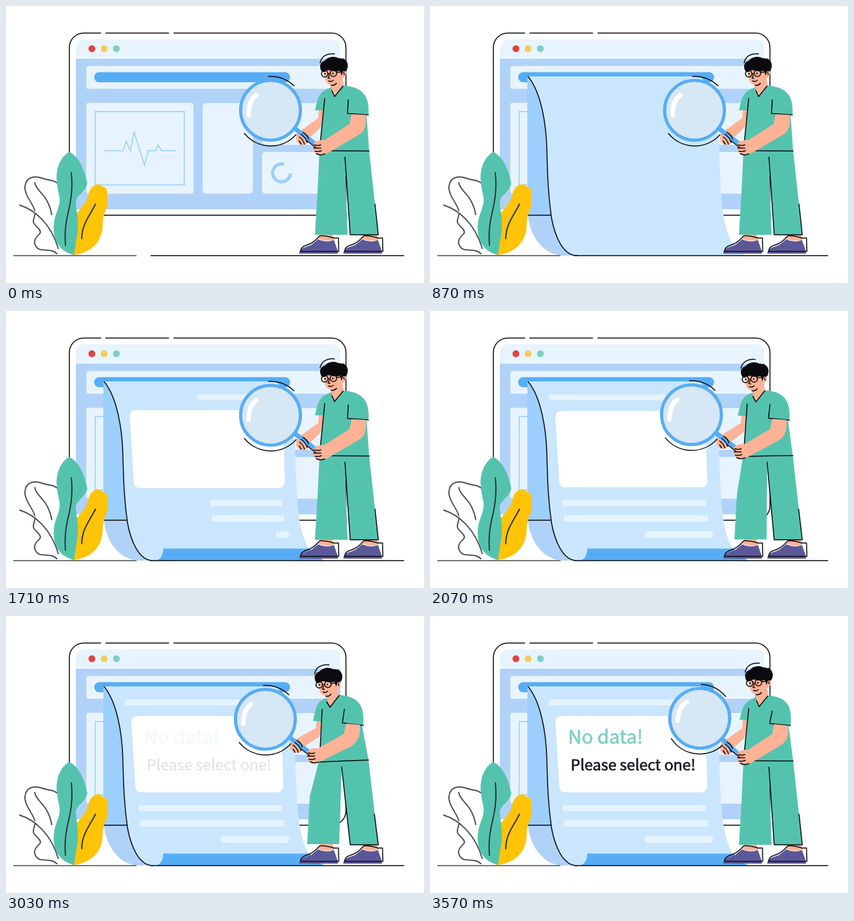
Recreate the animation shown at these times as an HTML page. Size 640x425 px, loop 4.5 s.

```html
<!DOCTYPE html>
<html lang="en">
<head>
<meta charset="utf-8">
<title>No data</title>
<style>
html, body { margin: 0; width: 100%; height: 100%; overflow: hidden; background: #fff }
svg { display: block; width: 100vw; height: 100vh }
.line { fill: none; stroke: #0b0b0f; stroke-width: 1.5; stroke-linecap: round; stroke-linejoin: round }
.vein { stroke: #2b3036; stroke-width: 1.9 }
.sprig { stroke: #4a4f54; stroke-width: 1.9 }
.panel { fill: #e7f4fe }
.chart { fill: none; stroke: #9dcffa; stroke-width: 1.6 }
.ring { stroke-width: 5 }
.blue { fill: #57adf4 }
.green { fill: #54c3ae }
.skin { fill: #ffb296 }
text { font-family: "Noto Sans CJK SC", "Noto Sans CJK JP", "Noto Sans", sans-serif; font-weight: 500; stroke-width: .65 }
</style>
</head>
<body>
<svg viewBox="0 0 640 425">
  <defs>
    <clipPath id="sheetClip"><rect id="sheetBox" x="140" y="108" width="360" height="0"/></clipPath>
    <clipPath id="rollClip"><rect id="rollBox" x="200" y="383" width="300" height="20"/></clipPath>
    <g id="shoe">
      <path class="skin" d="M481 350H500L503 358Q491 363 478 357Z"/>
      <path fill="#5b5899" d="M449 380C449 370 462 370 468 366L478 358Q490 364 502 359L508 376V380Z"/>
      <path class="line" d="M480 353C474 360 468 365 460 367C453 369 451 372 451 376.500H509.500L509 356H502Q491 352 481 352.500"/>
    </g>
  </defs>

  <!-- browser window -->
  <path class="panel" d="M107 81V64A13 13 0 0 1 120 51H499A13 13 0 0 1 512 64V81Z"/>
  <path fill="#b1d2f8" d="M107 81H512V312H107Z"/>
  <path class="line" d="M257 41.500H498.500A22 22 0 0 1 520.500 63.500V299A22 22 0 0 1 498.500 321H119A22 22 0 0 1 97 299V63.500A22 22 0 0 1 119 41.500H145M153 41.500H249"/>
  <circle cx="131.500" cy="65.500" r="5.200" fill="#e0413f"/>
  <circle cx="150.200" cy="65.500" r="5.200" fill="#f2cb5b"/>
  <circle cx="169" cy="65.500" r="5.200" fill="#80cfc0"/>
  <g class="panel">
    <rect x="123" y="92" width="374" height="35" rx="4"/>
    <rect x="123" y="148.500" width="164" height="139.500" rx="4"/>
    <rect x="301" y="149" width="77" height="139" rx="6"/>
    <rect x="392" y="149" width="105" height="64" rx="5"/>
    <rect x="392" y="224" width="105" height="64" rx="5"/>
  </g>
  <rect class="blue" x="135" y="101.500" width="300" height="15.500" rx="7.750"/>
  <g class="chart">
    <rect x="136.500" y="162" width="136.500" height="112.500"/>
    <path d="M150 222H179L184 207.500L190.500 222L196 193L212 244L218 222H229L233 213.500L238 222H260"/>
    <path class="ring" d="M426 242.900A13.700 13.700 0 1 0 435.600 257"/>
  </g>

  <!-- sheet of paper -->
  <g clip-path="url(#sheetClip)">
    <path fill="#b0d2f8" d="M150 321C152 350 172 383 205 383H225L200 300Z"/>
    <path fill="#9dcffd" d="M149 108V321H195L190 108Z"/>
    <path class="line" d="M149 321H190"/>
    <path fill="#c9e6fe" d="M150 108C170 132 178 180 179 222C180 262 181 290 186 325C191 352 203 383 225 383H489C467 383 455 352 450 325C445 290 444 262 443 222C442 180 434 132 414 108Z"/>
    <path class="line" d="M150 108C170 132 178 180 179 222C180 262 181 290 186 325C191 352 203 383 225 383"/>
  </g>
  <g clip-path="url(#rollClip)">
    <path class="blue" d="M240 364.500H465Q474 378 489 383H228Z"/>
    <path fill="#c9e6fe" d="M222 383C223 374 230 366 241 364.500C240 377 236 383 225 383Z"/>
  </g>
  <g id="bars" fill="#e5f3fe"></g>
  <path id="card" fill="#fff" d="M201 153.500H412Q421 153.500 421.500 163L424.500 261Q424 270.500 415 270.500H207Q198.500 270.500 198 261L192 163Q192 153.500 201 153.500Z"/>
  <g id="words">
    <text x="211.300" y="196" font-size="29" fill="#7fcfc0" stroke="#7fcfc0">No data!</text>
    <text x="215.500" y="237" font-size="23" fill="#15181f" stroke="#15181f">Please select one!</text>
  </g>

  <!-- ground and plant -->
  <path class="line" d="M222 383H609"/>
  <path class="line" style="stroke:#777;stroke-width:2" d="M12 383H199"/>
  <path class="line sprig" d="M78 380C68 370 52 379 46 369C40 360 47 354 52 349C56 343 42 337 42 331C41 327 44 324 44 320M44 314C42 304 28 290 29 277C31 259 48 261 58 265C66 268 72 266 79 272M44 271C47 286 64 288 70 320M21 305.500C45 313 69 335 80 372"/>
  <path fill="#ffc408" d="M104 382L108 320C114 309 124 302 126 290C128 280 134 274 140 273.500C146 273 147 278 152 279C157 281 154 291 156 300C156 310 148 318 148 335C148 362 130 379 104 382Z"/>
  <path class="green" d="M104 382C84 377 72 362 73 338C74 318 84 308 82 294C79 280 76 266 78 255C80 240 88 228 97 224C113 231 121 254 124.500 273C118 290 107 290 107 302C108 318 112 332 109 350Z"/>
  <path class="line vein" d="M100 256C103 285 98 305 94 322C90 340 90 355 91 367M137 304C128 322 116 335 116 357"/>

  <!-- man -->
  <use href="#shoe"/><use href="#shoe" x="67.500"/>
  <path id="legLeft" class="green"/>
  <path id="legRight" class="green"/>
  <path id="legLine" class="line"/>
  <path id="armLeft" class="skin"/>
  <path id="neck" class="skin" d="M498 112L515 110L517 123L503 140L497 124Z"/>
  <path id="shirt" class="green"/>
  <path id="seams" class="line"/>
  <g id="head">
    <path class="skin" d="M486 95C487 104 487 113 491 118Q497 123 504 120L513 112Q521 109 521 102Q520 97 515 98L512 90Z"/>
    <path fill="#0b0b0f" d="M484 101C479 95 480 86 488 84C492 78 503 76 509 80C517 79 525 87 522 95C522 100 519 101 516 100L514 107L511 99C503 103 497 97 492 99C488 101 486 102 484 101Z"/>
    <path class="line" d="M481 87C483 77 492 72 503 73.500M516 81C523 85 524 92 521 98"/>
    <circle class="line" cx="488" cy="104" r="5"/><circle class="line" cx="501.300" cy="103.300" r="5"/>
    <path class="line" d="M493 104H496M506 102L513 101M495 106L493 110.500L496 111M494 115Q498 117 501 114M498 121.500Q503 122.500 506 118.500M517 102L518 105"/>
    <circle cx="488.500" cy="104" r="1.200"/><circle cx="500.500" cy="103.500" r="1.200"/>
  </g>
  <path id="palm" class="skin" d="M449 191C442 198 443 209 449 212Q455 214 460 212C466 207 465 200 461 196Z"/>
  <g id="glass">
    <path d="M36 27L73 55" stroke="#57adf4" stroke-width="7"/>
    <circle r="45.800" fill="#d6e7f5" stroke="#57adf4" stroke-width="4.800"/>
    <path d="M-33.500 7Q-34 -14 -22 -23" fill="none" stroke="#fff" stroke-width="7" stroke-linecap="round"/>
    <path class="line" d="M-3 -52A52 52 0 0 1 36 -37.500M-40 35.500A52 52 0 0 0 39 37.500"/>
  </g>
  <path id="armRight" class="skin"/>
  <g id="fingers">
    <path class="skin" d="M471 211C475 205 485 205 494 207L493 225C486 229 477 229 473 224Q469 217 471 211Z"/>
    <path class="line" d="M455 194Q462 198 463 204M452 197Q459 202 461 209M449 201Q455 205 457 212M449 207L452 212M461 207L474 217M472 213Q478 215 482 213M471 218H482M473 223Q478 224 483 222M475 226.500Q481 230 488 227"/>
  </g>
</svg>
<script>
const LOOP = 4500;
const $ = id => document.getElementById(id);
const span = (t, from, to) => Math.min(1, Math.max(0, (t - from) / (to - from)));
const sine = u => (1 - Math.cos(Math.PI * u)) / 2;
const backOut = u => 1 + 2.28 * (u - 1) ** 3 + 1.28 * (u - 1) ** 2;

// Each body part in its poses: upright, leaning, straightened again.
const parts = {
  shirt: [
    'M498,125C487,128 480,134 477,144L473,160L486,160L480,222L556,222L552,166L555,166C557,138 546,124 516,122L503,139Z',
    'M491,126C482,128 476,134 474,144L470,161L484,162L480,224L555,221L545,167L547,167C549,138 541,124 510,121L496,140Z',
    'M499,125C488,128 481,134 478,144L474,159L487,160L480,222L556,222L549,168L552,168C555,138 547,124 517,122L504,139Z'],
  seams: [
    'M488,142L480,222L556,222.5M524,144L523,165L555,167M499,130L503,139L516,123',
    'M484,143L480,224L555,221M518,143L515,164L547,168M491,132L496,140L510,122',
    'M488,142L480,222L556,222.5M524,146L520,165L552,168M500,130L504,139L517,123'],
  armRight: [
    'M529,166L551,167C552,182 551,192 538,199L492,226L484,208L526,181Z',
    'M521,165L542,167C543,182 540,193 528,200L482,223L474,205L517,181Z',
    'M527,166L548,168C550,182 548,192 536,199L491,226L483,208L524,181Z'],
  armLeft: [
    'M479,158L478,172L450,192L464,203L482,186L487,158Z',
    'M476,160L474,172L442,190L455,201L480,185L484,160Z'],
  legLeft: [
    'M480,222L477,285L473,351L523,351L519,232L530,222Z',
    'M479,223L465,277L461,350L510,350L514,232L530,222Z'],
  legRight: [
    'M517,222L519,232L527,351L570,351L556,222Z',
    'M512,222L514,232L527,351L570,351L555,221Z'],
  legLine: [
    'M519,232L527,351L570,351L565,304',
    'M514,232L527,351L570,351L564,304']
};

// left, right, top, height, start, end
const bars = [
  [182, 404, 128, 9, 1470, 1950],
  [203, 423, 290, 9.5, 1470, 1950],
  [205, 426, 313.5, 9.5, 1470, 1950],
  [329, 433, 338, 10, 1650, 1980]
].map(spec => {
  const el = document.createElementNS('http://www.w3.org/2000/svg', 'rect');
  el.setAttribute('rx', 1);
  return $('bars').appendChild(Object.assign(el, { spec }));
});

const set = (el, attrs) => {
  for (const k in attrs) el.setAttribute(k, attrs[k]);
};
const mixPath = (a, b, u) => {
  const to = b.match(/[\d.]+/g);
  let i = 0;
  return a.replace(/[\d.]+/g, n => (+n + (to[i++] - n) * u).toFixed(2));
};

function drawMan(t) {
  const lean = sine(span(t, 1740, 2340)), rise = sine(span(t, 3000, 3550));
  const mix = (a, b, c) => rise ? b + (c - b) * rise : a + (b - a) * lean;
  const shift = (id, dx, dy, cx, cy) =>
    set($(id), { transform: `translate(${mix(0, dx, cx)} ${mix(0, dy, cy)})` });
  for (const id in parts) {
    const [a, b, c = a] = parts[id];
    set($(id), { d: rise ? mixPath(b, c, rise) : mixPath(a, b, lean) });
  }
  shift('head', -8.5, 1.5, 1.5, -1);
  shift('neck', -7, 1, 1, 0);
  shift('palm', -9.5, -3, 0, -0.5);
  shift('fingers', -9.5, -3, 0, -0.5);
  set($('glass'), { transform: `translate(${mix(405, 397, 413)} ${mix(160, 158.5, 157)}) rotate(${mix(0, 0, 6)})` });
}

function draw(t) {
  set($('sheetBox'), { height: Math.min(276, 67 * (t / 540) ** 3) });
  set($('rollBox'), { y: 383 - 19 * span(t, 885, 1170) });
  for (const el of bars) {
    const [left, right, y, height, from, to] = el.spec;
    const width = (right - left) * span(t, from, to);
    set(el, { x: right - width, y, width, height });
  }
  const size = backOut(span(t, 1470, 1980));
  set($('card'), { transform: `translate(308 212) scale(${size}) translate(-308 -212)` });
  set($('words'), { opacity: 1 - (1 - span(t, 3000, 3570)) ** 2 });
  drawMan(t);
}

const start = performance.now();
function tick() {
  draw((performance.now() - start) % LOOP);
  requestAnimationFrame(tick);
}
tick();
</script>
</body>
</html>
```
